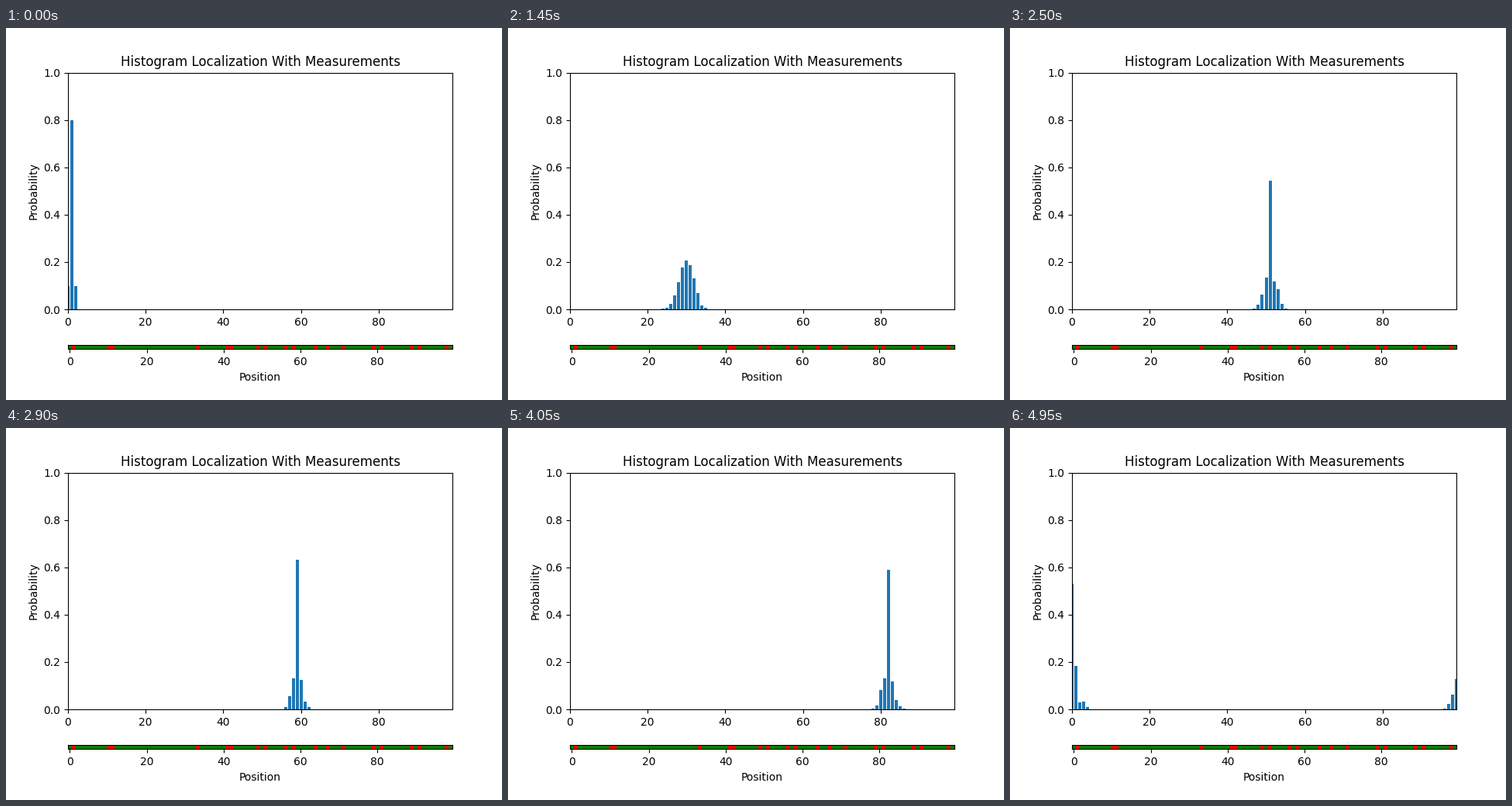
Write a matplotlib script that moves like this. It is 640x480 px and loops after 5 s.

```python
import numpy as np
import matplotlib.pyplot as plt
from matplotlib.animation import FuncAnimation
from matplotlib.colors import ListedColormap

CELLS = 100
STEPS = 100
INTERVAL = 50  # ms
RED_CELLS = [1, 10, 11, 33, 41, 42, 49, 51, 56, 58, 64, 67, 71, 79, 81, 89, 91, 98]
P_HIT, P_MISS = 0.6, 0.2
P_EXACT, P_SLIP = 0.8, 0.1

world = np.zeros(CELLS, dtype=int)
world[RED_CELLS] = 1


def sense(belief, reading):
    """Weight each cell by how well it fits the reading."""
    weighted = belief * np.where(world == reading, P_HIT, P_MISS)
    return weighted / weighted.sum()


def move(belief):
    """Shift one cell ahead on the ring, with some chance of under- or overshoot."""
    return (P_EXACT * np.roll(belief, 1)
            + P_SLIP * belief
            + P_SLIP * np.roll(belief, 2))


def localize():
    belief = np.zeros(CELLS)
    belief[0] = 1.0
    history = []
    for position in range(STEPS):
        belief = move(sense(belief, world[position]))
        history.append(belief)
    return history


history = localize()

fig, (ax, strip) = plt.subplots(
    2, 1, figsize=(6.4, 4.8), dpi=100, gridspec_kw={"height_ratios": [10, 1]})

bars = ax.bar(np.arange(CELLS), history[0], width=0.8, color="#1f77b4")
ax.set_xlim(0, CELLS - 1)
ax.set_ylim(0, 1)
ax.set_title("Histogram Localization With Measurements")
ax.set_ylabel("Probability")

strip.imshow(world[np.newaxis, :], cmap=ListedColormap(["green", "red"]),
             interpolation="nearest")
strip.set_yticks([])
strip.set_xlabel("Position")


def update(step):
    for bar, height in zip(bars, history[step]):
        bar.set_height(height)
    return bars.patches


anim = FuncAnimation(fig, update, frames=STEPS, interval=INTERVAL,
                     repeat=True, repeat_delay=0, blit=False)
plt.show()
```
